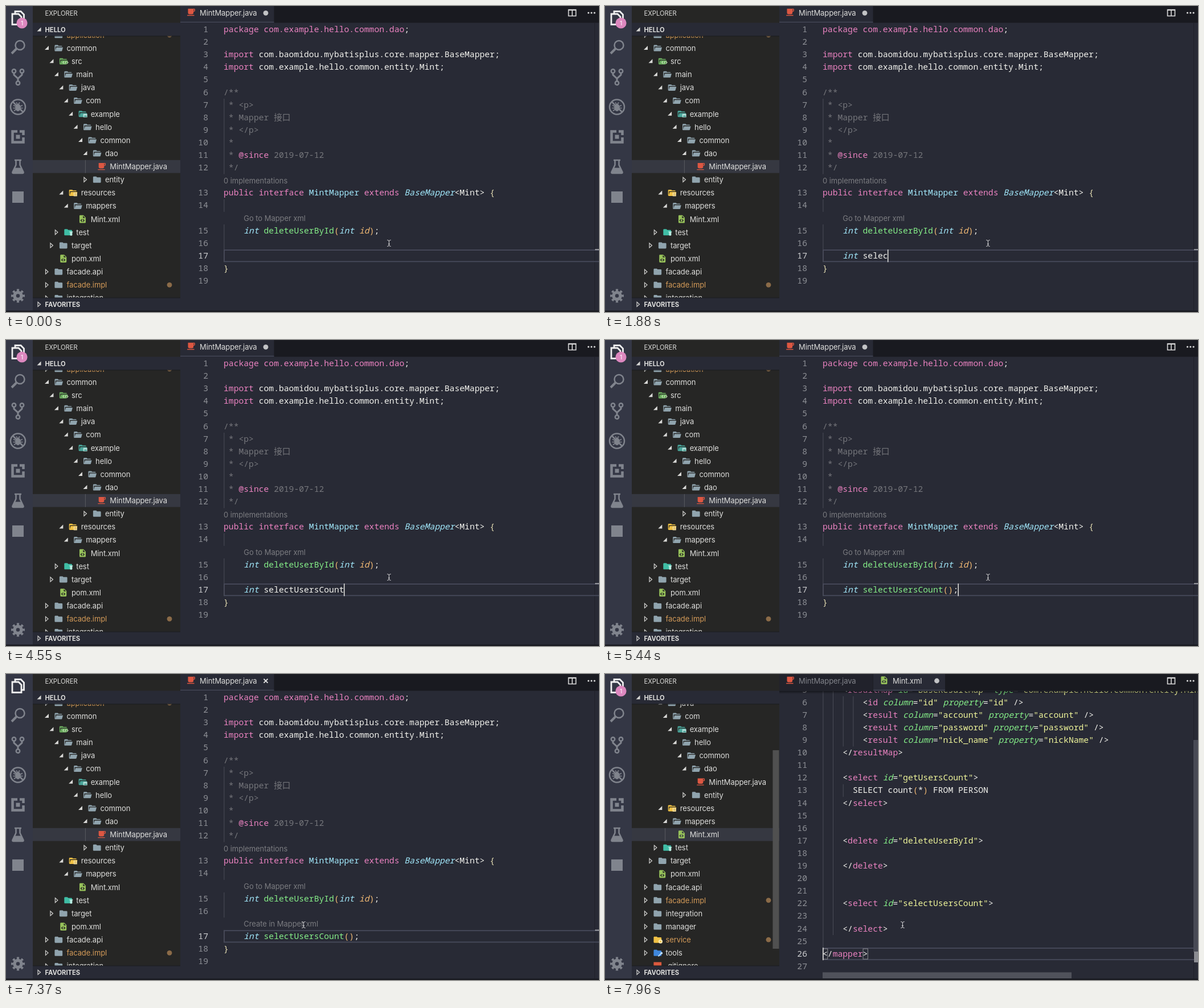
An HTML page that plays this animation: 1041x538 px, repeating every 8 s.

```html
<!DOCTYPE html>
<html lang="en">
<head>
<meta charset="utf-8">
<title>Editor typing</title>
<style>
  html, body { margin: 0; width: 100%; height: 100%; overflow: hidden; background: #282a35; }
  svg { display: block; }
  text { white-space: pre; }
  .ui { font: 13px Inter, Roboto, sans-serif; letter-spacing: -.1px; fill: #dededc; }
  .head { font-size: 11.2px; letter-spacing: 0; }
  .bold { font-weight: 700; }
  .lens { fill: #7b7c80; letter-spacing: -.05px; }
  .code { font: 14.7px "Noto Sans Mono", "Noto Sans CJK SC", monospace; fill: #f2f2ed; }
  .num { fill: #8e9096; text-anchor: end; }
  .num.on { fill: #cdced0; }
  .p { fill: #ea82c0; }
  .c { fill: #a1e7fa; }
  .i { fill: #a1e7fa; font-style: italic; }
  .g { fill: #85ee88; }
  .a { fill: #85ee88; font-style: italic; }
  .v { fill: #b996ee; font-style: italic; }
  .y { fill: #eff59a; }
  .o { fill: #f1b974; }
  .d { fill: #f1b974; font-style: italic; }
  .b { fill: #e6dfb4; }
  .m { fill: #75767b; }
  .u { text-decoration: underline; }
  .line { fill: none; stroke: #80848d; stroke-width: 2.5; }
</style>
</head>
<body>
<svg id="stage" width="1041" height="538" xmlns="http://www.w3.org/2000/svg">
  <defs>
    <clipPath id="treeClip"><rect x="47" y="52" width="259" height="461"/></clipPath>
    <clipPath id="codeClip"><rect x="306" y="30" width="735" height="505.5"/></clipPath>
    <linearGradient id="shade" x2="0" y2="1">
      <stop stop-color="#000" stop-opacity=".45"/><stop offset="1" stop-color="#000" stop-opacity="0"/>
    </linearGradient>
  </defs>
  <rect width="1041" height="538" fill="#282a35"/>
  <g id="code" clip-path="url(#codeClip)"></g>
  <g id="tabs"></g>
  <rect x="47" width="259" height="538" fill="#262625"/>
  <g id="tree" clip-path="url(#treeClip)"></g>
  <g id="sections"></g>
  <g id="bar"></g>
  <rect y="535.5" width="1041" height="3" fill="#191a20"/>
  <g id="top"></g>
</svg>
<script>
const X0 = 382, CW = 8.82, TOP = 30.4, ROW = 22.1, TREE_ROW = 23.13, BASE = 15.6;
const $ = id => document.getElementById(id);
const esc = s => s.replace(/&/g, '&amp;').replace(/</g, '&lt;').replace(/>/g, '&gt;');
const rect = (x, y, w, h, fill, more = '') =>
  `<rect x="${x}" y="${y}" width="${w}" height="${h}" fill="${fill}" ${more}/>`;
const dot = (x, y, r, fill) => `<circle cx="${x}" cy="${y}" r="${r}" fill="${fill}"/>`;
const label = (x, y, s, cls = '', more = '') =>
  `<text class="ui ${cls}" x="${x}" y="${y + 4.9}" ${more}>${esc(s)}</text>`;
const at = (x, y, body) => `<g transform="translate(${x} ${y})">${body}</g>`;

// "^x" switches the token class to x
const tokens = s => s.split('^').map((part, n) =>
  n ? `<tspan class="${part[0]}">${esc(part.slice(1))}</tspan>` : esc(part)).join('');
const codeText = (x, y, s) => `<text class="code" x="${x}" y="${y + BASE}">${tokens(s)}</text>`;
const lineNo = (n, y, on) => `<text class="code num${on ? ' on' : ''}" x="355" y="${y + BASE}">${n}</text>`;
const guide = (col, y, rows) => rect(X0 + .4 + col * CW, y, 1, rows * ROW, '#4b4d58');
const caret = (x, y) => rect(x - .7, y, 1.5, ROW, '#e4e4e0');
const activeLine = y =>
  `<rect x="383" y="${y + .9}" width="670" height="${ROW - 1.9}" fill="none" stroke="#474a5b" stroke-width="1.8"/>`;

/* ---------- icons ---------- */
const SHAPES = {
  open: 'M19 20H4c-1.11 0-2-.9-2-2V6c0-1.11.89-2 2-2h6l2 2h7a2 2 0 0 1 2 2H4v10l2.14-8h17.07l-2.28 8.5c-.23.87-1.01 1.5-1.93 1.5z',
  shut: 'M10 4H4c-1.1 0-2 .9-2 2v12c0 1.1.9 2 2 2h16c1.1 0 2-.9 2-2V8c0-1.1-.9-2-2-2h-8z',
  cup: 'M2 21h18v-2H2zM20 8h-2V5h2m0-2H4v10a4 4 0 0 0 4 4h6a4 4 0 0 0 4-4v-3h2a2 2 0 0 0 2-2V5a2 2 0 0 0-2-2z',
  xml: 'M13 9h5.5L13 3.5zM6 2h8l6 6v12a2 2 0 0 1-2 2H6a2 2 0 0 1-2-2V4a2 2 0 0 1 2-2m.1 13.5l3.8 3.7 1.4-1.4-2.3-2.3 2.3-2.3-1.4-1.4zm11.2 0l-3.8-3.7-1.4 1.4 2.3 2.3-2.3 2.3 1.4 1.4z',
  square: 'M2 2h20v20H2z'
};
const icon = (x, y, kind, color, size = 16.5) =>
  `<path transform="translate(${x - size / 2} ${y - size / 2}) scale(${size / 24})" d="${SHAPES[kind]}" fill="${color}" fill-rule="evenodd"/>`;
const MARKS = {
  code: '<path d="M0 -1l-2 2.2 2 2.2M5 -1l2 2.2 -2 2.2M3.3 -1.5l-1.4 5" fill="none" stroke="#c5e3b8" stroke-width="1.2"/>',
  image: rect(0, -1, 7, 6, '#b5dfd9') + '<path d="M1 4l2-3 1.5 1.7 1-1 1 2.3z" fill="#3d9a90"/>',
  list: rect(0, -1.5, 6, 6.5, '#f6e2a2') + rect(1.3, 0, 3.4, 1, '#c99b2f') + rect(1.3, 2.2, 3.4, 1, '#c99b2f'),
  tube: rect(2, -2, 4, 7, '#b9ede2', 'rx="1.5"') + rect(1, -2.4, 6, 1.4, '#b9ede2'),
  gear: '<circle cx="4" cy="2" r="2.5" fill="none" stroke="#faeab5" stroke-width="2"/>',
  tool: '<path d="M0 5l5.5-5.5" stroke="#bcdcf8" stroke-width="2"/>' + dot(5.7, -.7, 2, '#bcdcf8')
};
const arrow = (x, y, open) => open
  ? `<path d="M${x + 3} ${y - 4}v7h-7z" fill="#d8d8d6"/>`
  : `<path d="M${x - 2.5} ${y - 4}l4.5 4-4.5 4z" fill="none" stroke="#d0d0ce" stroke-width="1.2"/>`;

/* ---------- explorer ---------- */
const GRAY = '#90a4ae', RED = '#dd5742', GREEN = '#96c15a', ORANGE = '#d39a58';
// level, name, shape, colour, mark, modified
const FILES = [
  [0, 'application', 'shut', GRAY, '', 1], [0, 'common', 'open'], [1, 'src', 'open', '#6bad5f', 'code'],
  [2, 'main', 'open'], [3, 'java', 'open'], [4, 'com', 'open'], [5, 'example', 'open', '#4aa59a', 'image'],
  [6, 'hello', 'open'], [7, 'common', 'open'], [8, 'dao', 'open'], [9, 'MintMapper.java', 'cup', RED],
  [8, 'entity', 'shut'], [3, 'resources', 'open', '#f0c145', 'list'], [4, 'mappers', 'open'],
  [5, 'Mint.xml', 'xml', GREEN], [2, 'test', 'shut', '#3fbda5', 'tube'], [1, 'target', 'shut'],
  [1, 'pom.xml', 'xml', GREEN], [0, 'facade.api', 'shut'], [0, 'facade.impl', 'shut', GRAY, '', 1],
  [0, 'integration', 'shut'], [0, 'manager', 'shut'], [0, 'service', 'shut', '#f0c145', 'gear', 1],
  [0, 'tools', 'shut', '#3f87dc', 'tool'], [0, '.gitignore', 'square', '#dc5a3e']
];

function drawTree(s) {
  const first = s.xml ? 5 : 1, selected = s.xml ? 14 : 10;
  let out = '';
  FILES.forEach(([level, name, shape, color = GRAY, mark, changed], n) => {
    const y = 74 + (n - first) * TREE_ROW, x = 72 + level * 8.43;
    if (y < 45 || y > 520) return;
    if (n === selected)
      out += rect(47, y - 11.3, 259, 22.8, '#363841') + rect(x - 9, y - 11.3, 1, 22.8, '#5a5b60');
    if (shape === 'open' || shape === 'shut') out += arrow(x, y, shape === 'open');
    out += icon(x + 20.3, y, shape, color);
    if (mark) out += at(x + 21.5, y + 1, MARKS[mark]);
    out += label(x + 34.5, y, name, '', changed ? `style="fill:${ORANGE}"` : '');
    if (changed) out += dot(287, y, 4.4, '#8b6b48');
  });
  if (s.scrolled) out += rect(294.5, 134, 11, 349, '#505050');
  $('tree').innerHTML = out;
}

/* ---------- tabs ---------- */
const activeTab = (x, w) => rect(x, 0, w, 30, '#282a35') + rect(x, 27.8, w, 1.2, '#474a5b');

function drawTabs(s) {
  let out = rect(306, 0, 735, 29.5, '#191a20')
    + (s.xml ? rect(306, 0, 164.5, 29.5, '#21222b') + activeTab(471, 126) : activeTab(306, 164.5))
    + icon(325, 11, 'cup', RED) + label(340, 12, 'MintMapper.java', '', s.xml ? 'style="fill:#82848b"' : '');
  if (s.xml)
    out += icon(490, 11, 'xml', GREEN) + label(505, 12, 'Mint.xml') + dot(582.5, 12, 4.4, '#c2c3c5');
  else out += s.saved
    ? '<path d="M452.5 8.7l7 7m0-7l-7 7" stroke="#e2e2e2" stroke-width="1.9"/>'
    : dot(456, 12.3, 4.4, '#c2c3c5');
  out += '<path d="M987.5 6.5h13v11h-13zM994 7v10M987 7.2h14" fill="none" stroke="#dadada" stroke-width="1.6"/>';
  for (const x of [1022.5, 1027.8, 1033.1]) out += dot(x, 12, 1.6, '#dadada');
  $('tabs').innerHTML = out;
}

/* ---------- code ---------- */
const JAVA = [
  '^ppackage com.example.hello.common.dao^w;', '',
  '^pimport^w com.baomidou.mybatisplus.core.mapper.BaseMapper;',
  '^pimport^w com.example.hello.common.entity.Mint;', '',
  '^m/**', '^m * <p>', '^m * Mapper 接口', '^m * </p>', '^m *', '^m * ^p@since^m 2019-07-12', '^m */',
  '^ppublic interface ^cMintMapper ^pextends ^iBaseMapper^w<Mint> ^b{', '',
  '    ^iint ^gdeleteUserById^o(^iint ^did^o)^w;', '', '', '^b}', ''
];
const attr = (name, value) => ` ^a${name}^w=^y"${value}"`;
const tag = (name, attrs, end = '>') => `<^p${name}${attrs}^w${end}`;
const column = (name, prop, kind = 'result') =>
  '        ' + tag(kind, attr('column', name) + attr('property', prop), ' />');
const close = name => `    </^p${name}^w>`;
const XML = [
  `<?^pxml${attr('version', '1.0')}${attr('encoding', 'UTF-8')}^w?>`,
  '<!^pDOCTYPE ^vmapper ^wPUBLIC ^y"-//mybatis.org//DTD Mapper 3.0//EN" "^uhttp://mybatis.org/dtd/mybatis-3-mapper.dtd^y"^w>',
  tag('mapper', attr('namespace', 'com.example.hello.common.dao.MintMapper')), '',
  '    ' + tag('resultMap', attr('id', 'BaseResultMap') + attr('type', 'com.example.hello.common.entity.Mint')),
  column('id', 'id', 'id'), column('account', 'account'), column('password', 'password'),
  column('nick_name', 'nickName'), close('resultMap'), '',
  '    ' + tag('select', attr('id', 'getUsersCount')),
  '      SELECT count^o(^w*^o)^w FROM PERSON', close('select'), '', '',
  '    ' + tag('delete', attr('id', 'deleteUserById')), '', close('delete'), '', '',
  '    ' + tag('select', attr('id', 'selectUsersCount')), '', close('select'), '',
  '</^pmapper^w>', ''
];

function typedTokens(s) {
  if (!s.startsWith('int')) return s;
  const [name, tail] = s.slice(3).split('(');
  if (tail === undefined) return '^iint^w' + name;
  return `^iint^g${name}^o()^w${tail.slice(1)}`;
}

function popup(x, y) {
  let out = rect(x + .5, y + .5, 451, 65.5, '#22232b', 'stroke="#15161b"') + rect(x + 1, y, 451, ROW, '#434758');
  ['dao', 'deleteUserById', 'dowhile'].forEach((word, n) => {
    const top = y + n * ROW, box = 'fill="none" stroke="#c6c7ca"';
    out += n < 2
      ? `<rect x="468.5" y="${top + 5.5}" width="13.5" height="10.5" ${box}/><text x="469.8" y="${top + 13.2}" style="font:700 6.5px Inter,sans-serif" fill="#d2d3d6">abc</text>`
      : `<path d="M469.5 ${top + 14}v-9.5h12v9.5" ${box} stroke-width="1.5"/><path d="M469 ${top + 16.5}h14" ${box} stroke-width="2" stroke-dasharray="2 1.5"/>`;
    out += `<text class="code" x="488" y="${top + BASE}"><tspan class="c bold">d</tspan>${word.slice(1)}</text>`;
  });
  return out;
}

function drawJava(s) {
  const yOf = n => {
    const lensRows = (n >= 13) + (n >= 15) + (n >= 17 && s.gap ? 1 : 0);
    return TOP + (n - 1 + lensRows) * ROW;
  };
  const y17 = yOf(17);
  let out = activeLine(y17) + guide(0, yOf(7), 6) + guide(0, yOf(14), 1) + guide(0, yOf(15), 2) + guide(0, y17, 1);
  JAVA.forEach((line, n) => {
    const y = yOf(n + 1);
    out += lineNo(n + 1, y, n === 16) + codeText(X0, y, n === 16 ? '    ' + typedTokens(s.text) : line);
  });
  const lens = (col, n, words) => label(X0 + col * CW, yOf(n) - ROW + 11.1, words, 'lens');
  if (s.lens) out += lens(0, 13, '0 implementations');
  out += lens(4, 15, 'Go to Mapper xml');
  if (s.create) out += lens(4, 17, 'Create in Mapper xml');
  if (s.caret) out += caret(X0 + (4 + s.text.length - (s.inside ? 1 : 0)) * CW, y17);
  if (s.pop) out += popup(461, y17 + ROW);
  return out + rect(1034, y17 - .8, 7, 1.8, '#a4a5a9');
}

function drawXml(s) {
  const shift = s.scrolled ? 101.8 : 0, yOf = n => TOP + (n - 1) * ROW - shift;
  let out = s.scrolled ? activeLine(yOf(26)) : '';
  out += guide(0, yOf(4), 22) + guide(2, yOf(5), 20) + guide(4, yOf(6), 4) + guide(6, yOf(6), 4) + guide(4, yOf(13), 1);
  XML.forEach((line, n) => {
    const y = yOf(n + 1);
    if (y > 0 && y < 538) out += lineNo(n + 1, y, s.scrolled && n === 25) + codeText(X0, y, line);
  });
  if (s.scrolled) {
    const y = yOf(26);
    for (const col of [0, 8])
      out += rect(X0 + col * CW + .5, y + 2, CW - .5, ROW - 4, 'none', 'stroke="#8a8b90"');
    out += caret(X0 + .8, y) + rect(306, 30, 735, 5, 'url(#shade)') + rect(1033, 116, 8, 373, '#484a55');
  }
  out += rect(382, 524.5, 437, 11, '#50525b', `opacity="${s.scrolled ? 1 : .2}"`);
  return out + (s.scrolled ? rect(1034, 488, 7, 19, '#8b8c92') : rect(1034, 488.2, 7, 1.8, '#a4a5a9'));
}

function drawTop(s) {
  const [x, y] = s.mouse;
  $('top').innerHTML = (s.badge ? dot(28, 30, 9.6, '#dd88bf')
    + '<text class="ui" x="28" y="33.8" text-anchor="middle" style="font-size:10.5px;fill:#fff">1</text>' : '')
    + at(x + .4, y, '<path d="M-3.2-5.5q3 0 3.2 2 .2-2 3.2-2M-3.2 5.5q3 0 3.2-2 .2 2 3.2 2M0-4v8M-1.5 1.5h3" fill="none" stroke="#d8d8da"/>');
}

/* ---------- fixed parts ---------- */
const K = '#80848d';
const line = (d, more = '') => `<path class="line" d="${d}" ${more}/>`;
$('sections').innerHTML = label(68.5, 11.8, 'EXPLORER', 'head')
  + rect(47, 29.5, 259, 23, '#282a35') + rect(47, 52.5, 259, 1, '#1b1c20')
  + rect(47, 513, 259, 23, '#282a35') + rect(47, 512.5, 259, 1, '#1b1c20')
  + arrow(58.5, 41.5, true) + label(68.5, 40.8, 'HELLO', 'head bold')
  + arrow(58.5, 524.5, false) + label(68.5, 524.3, 'FAVORITES', 'head bold');
$('bar').innerHTML = rect(0, 0, 47, 538, '#343745')
  + at(21, 21, line('M-5-7V-11.5H5L10.5-6V7H6M-10-7H1L6-2V11.5H-10z', 'style="stroke:#f0f0f0;stroke-width:2.8"'))
  + at(21, 72, '<circle class="line" cx="3.5" cy="-3" r="8"/>' + line('M-2.5 3l-8.5 8.5', 'style="stroke-width:4"'))
  + at(21, 125, [[-7, -10.5], [7, -10.5], [0, 10.5]].map(([x, y]) => `<circle class="line" cx="${x}" cy="${y}" r="3.2"/>`).join('')
    + line('M-7-7v3l7 6.5 7-6.5v-3M0 2v5', 'style="stroke-width:3"'))
  + at(21, 177.5, `<ellipse cy="1" rx="4.8" ry="6.5" fill="${K}"/>`
    + line('M-8-3l4 2M8-3l-4 2M-8.5 2h17M-7 7l4-3M7 7l-4-3M-3-8l2 3M3-8l-2 3', 'style="stroke-width:1.6"')
    + '<circle class="line" r="13"/>' + line('M-9-9L9 9'))
  + at(21, 230, line('M-1-9.5H-9.5V9.5H9.5V1M3-9.5H9.5V-3', 'style="stroke-width:4.5"') + rect(-3.5, -3.5, 7, 7, K))
  + at(21, 282.5, line('M-6-11.5H6M-3.5-11V-3L-9.5 9.5Q-10 11.5-8 11.5H8Q10 11.5 9.5 9.5L3.5-3V-11')
    + `<path d="M-6 2h12l4 9H-10z" fill="${K}"/>`)
  + rect(11, 326, 20, 20, K)
  + at(21, 509.5, `<circle r="6" fill="none" stroke="${K}" stroke-width="5.5"/>`
    + `<circle r="10" fill="none" stroke="${K}" stroke-width="4" pathLength="80" stroke-dasharray="5 5" stroke-dashoffset="2.5"/>`);

/* ---------- timeline ---------- */
const START = { text: '', lens: 1, badge: 1, mouse: [672, 417] };
const STEPS = [
  [0, {}], [150, { text: 'i', caret: 1 }], [300, { text: 'int' }], [540, { text: 'int ' }],
  [840, { text: 'int d', pop: 1 }], [1130, { text: 'int ', pop: 0 }],
  [3660, { lens: 0 }], [3960, { lens: 1 }],
  [4990, { text: 'int selectUsersCount()', inside: 1 }], [5290, { inside: 0 }],
  [5440, { text: 'int selectUsersCount();' }],
  [5890, { gap: 1 }], [6040, { create: 1 }], [6330, { saved: 1 }],
  [6480, { badge: 0, caret: 0 }], [6630, { mouse: [640, 424] }], [6770, { mouse: [562, 438] }],
  [6920, { mouse: [522, 441], caret: 1 }], [7370, { caret: 0 }],
  [7670, { xml: 1 }], [7810, { scrolled: 1 }], [7960, { badge: 1 }]
];
const KEYS = [1280, 1430, 1580, 1730, 1880, 2180, 2480, 2630, 2770, 2920, 3360, 3960, 4110, 4250, 4400, 4550];
KEYS.forEach((time, n) => STEPS.push([time, { text: 'int ' + 'selectUsersCount'.slice(0, n + 1) }]));
STEPS.sort((a, b) => a[0] - b[0]);

let shown = -1;
function frame() {
  const t = performance.now() % 8000;
  const due = STEPS.filter(([time]) => time <= t);
  if (due.length !== shown) {
    shown = due.length;
    const s = Object.assign({}, START, ...due.map(([, change]) => change));
    $('code').innerHTML = rect(1033, 30, 1, 506, '#20212a') + (s.xml ? drawXml(s) : drawJava(s));
    drawTabs(s);
    drawTree(s);
    drawTop(s);
  }
  requestAnimationFrame(frame);
}
frame();
</script>
</body>
</html>
```
